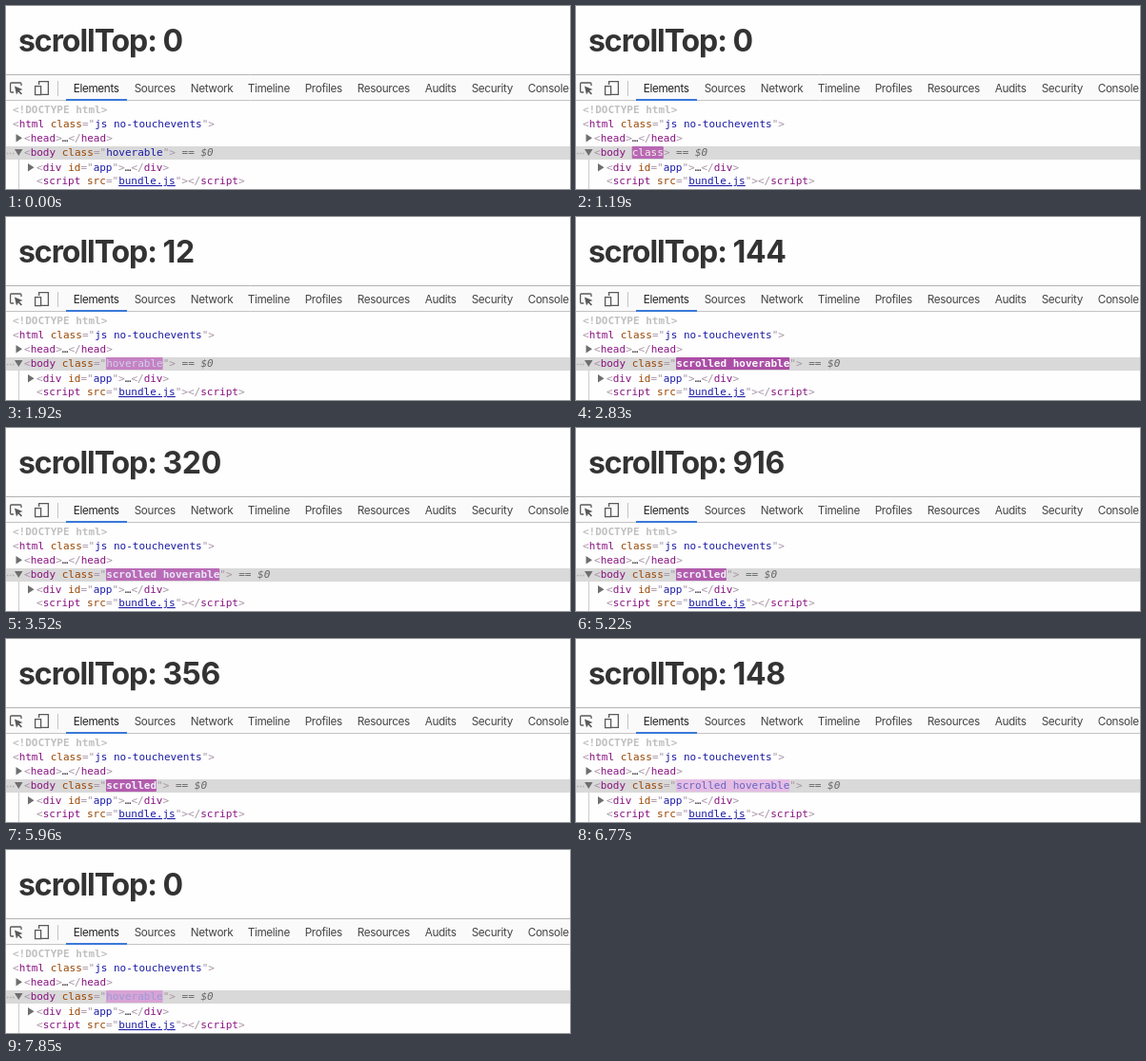
These frames come from a looping animation (592x193 px, 7990 ms). An HTML page:

```html
<!DOCTYPE html>
<html>
<head>
<meta charset="utf-8">
<style>
  html, body { margin: 0; width: 100%; height: 100%; overflow: hidden; background: #fefefe; }
  svg { display: block; }
  .title { font: 700 32px Inter, sans-serif; letter-spacing: -1.05px; fill: #333; }
  #count { letter-spacing: -.3px; }
  .tabs { font: 11.7px Inter, sans-serif; letter-spacing: -.32px; fill: #444; }
  .code { font: 11px "DejaVu Sans Mono", monospace; fill: #a894a6; }
  .code text { white-space: pre; }
  .tag { fill: #881280; }
  .attr { fill: #994500; }
  .value { fill: #1a1aa6; }
  .dim { fill: #c0c0c0; font-weight: bold; }
  .dark { fill: #333; }
  .icon { fill: none; stroke: #5a5a5a; stroke-width: 1.3; }
</style>
</head>
<body>
<svg width="592" height="193" viewBox="0 0 592 193">
  <g class="title">
    <text x="13" y="47.5">scrollTop:</text>
    <text id="count" x="164.5" y="47.5">0</text>
  </g>

  <rect y="72" width="592" height="28" fill="#fafafa"/>
  <path d="M0 72.5H592" stroke="#b4b4b4"/>
  <path d="M0 99.5H592M54.5 79V95" stroke="#c4c4c4"/>
  <rect x="63" y="98" width="64" height="2" fill="#3879d9"/>
  <g class="icon">
    <path d="M8 91H5.5Q4.6 91 4.6 90V82Q4.6 81 5.5 81H15Q16 81 16 82V84"/>
    <path d="M9 84.500L17.500 88L14 89.300L17 92.500L15.800 93.600L12.800 90.400L11 93.500Z" fill="#5a5a5a" stroke="none"/>
    <path d="M34.600 83V79.600H44.400V93.400H37"/>
    <rect x="30.600" y="84.600" width="6" height="9"/>
  </g>
  <g class="tabs" id="tabs"></g>

  <rect y="148" width="592" height="14" fill="#d9d9d9"/>
  <path d="M13.500 162V193" stroke="#ccc"/>
  <path d="M10.500 135V143.500L17 139.250ZM9 151H17.500L13.250 158ZM23 166V174.500L29.500 170.250Z" fill="#6e6e6e"/>
  <path d="M1 155.500h1.500M4 155.500h1.500M7 155.500h1.500" stroke="#b0b0b0" stroke-width="1.500"/>
  <rect id="flash" y="148" height="13" rx="1"/>
  <g class="code">
    <text x="7" y="113" class="dim">&lt;!DOCTYPE html&gt;</text>
    <text x="7" y="128">&lt;<tspan class="tag">html</tspan> <tspan class="attr">class</tspan>="<tspan class="value">js no-touchevents</tspan>"&gt;</text>
    <text x="19" y="143">&lt;<tspan class="tag">head</tspan>&gt;<tspan class="dark">…</tspan>&lt;/<tspan class="tag">head</tspan>&gt;</text>
    <text x="19" y="158">&lt;<tspan class="tag">body</tspan> <tspan class="attr" id="attr">class</tspan><tspan id="open">="</tspan><tspan class="value" id="value">hoverable</tspan><tspan id="close">"</tspan>&gt;<tspan fill="#666"> == <tspan font-style="italic">$0</tspan></tspan></text>
    <text x="32" y="174">&lt;<tspan class="tag">div</tspan> <tspan class="attr">id</tspan>="<tspan class="value">app</tspan>"&gt;<tspan class="dark">…</tspan>&lt;/<tspan class="tag">div</tspan>&gt;</text>
    <text x="32" y="188">&lt;<tspan class="tag">script</tspan> <tspan class="attr">src</tspan>="<tspan class="value" text-decoration="underline">bundle.js</tspan>"&gt;&lt;/<tspan class="tag">script</tspan>&gt;</text>
  </g>
</svg>
<script>
const LOOP = 7990, CHAR = 6.62;
const $ = id => document.getElementById(id);

const tabs = { Elements: 71, Sources: 135, Network: 194, Timeline: 254, Profiles: 314,
  Resources: 369, Audits: 440, Security: 489, Console: 548 };
$('tabs').innerHTML = Object.entries(tabs).map(([name, x]) =>
  `<text x="${x - .3}" y="91"${name === 'Elements' ? ' fill="#222"' : ''}>${name}</text>`).join('');

// Scroll gestures: start, end, final scrollTop
const scrolls = [
  [1080, 1668, 12], [2000, 2340, 104], [2560, 2740, 144], [3000, 3340, 320], [3600, 4165, 560],
  [4400, 4980, 960], [5150, 5560, 392], [5890, 6180, 148], [7360, 7450, 0]
];

// Class attribute changes; "hoverable" is dropped while scrolling
const both = 'scrolled hoverable';
const changes = [
  [-2000, 'hoverable'], [1080, ''], [1728, 'hoverable'], [2000, ''], [2200, 'scrolled'],
  [2400, both], [2560, 'scrolled'], [2785, both], [3000, 'scrolled'], [3400, both],
  [3600, 'scrolled'], [4225, both], [4400, 'scrolled'], [5040, both], [5140, 'scrolled'],
  [5620, both], [5880, 'scrolled'], [6240, both], [7360, 'scrolled'], [7500, 'hoverable']
];

const clamp = v => Math.min(1, Math.max(0, v));
const smooth = u => u * u * (3 - 2 * u);
const mix = (a, b, p) => `rgb(${a.map((v, i) => Math.round(v + (b[i] - v) * p))})`;

// cubic-bezier(0, 0, .2, 1)
function easeOut(x) {
  let lo = 0, hi = 1;
  for (let i = 0; i < 20; i++) {
    const s = (lo + hi) / 2;
    if (.6 * s * s + .4 * s ** 3 < x) lo = s; else hi = s;
  }
  return smooth(lo);
}

function scrollTop(t) {
  let top = 0;
  for (const [start, end, to] of scrolls)
    top += (to - top) * smooth(clamp((t - start) / (end - start)));
  return Math.round(top / 4) * 4;
}

function draw(t) {
  $('count').textContent = scrollTop(t);

  const [since, cls] = changes.filter(c => c[0] <= t).pop();
  $('value').textContent = cls;
  $('open').textContent = cls ? '="' : '';
  $('close').textContent = cls ? '"' : '';

  const age = t - since;
  const fade = easeOut(clamp(age / 1120));
  const flash = $('flash');
  flash.setAttribute('x', cls ? 105 : 58.7);
  flash.setAttribute('width', (cls || 'class').length * CHAR);
  flash.setAttribute('fill', mix([158, 54, 153], [245, 219, 244], fade));
  flash.setAttribute('opacity', 1 - easeOut(clamp((age - 1120) / 280)));

  // White text on the strong flash looks heavier
  const ink = base => mix([255, 255, 255], base, fade * fade);
  $('value').style.fill = ink([26, 26, 166]);
  $('value').style.fontWeight = fade < .4 ? 'bold' : '';
  $('attr').style.fill = cls ? '' : ink([153, 69, 0]);
}

function tick() {
  draw(performance.now() % LOOP);
  requestAnimationFrame(tick);
}
tick();
</script>
</body>
</html>
```
